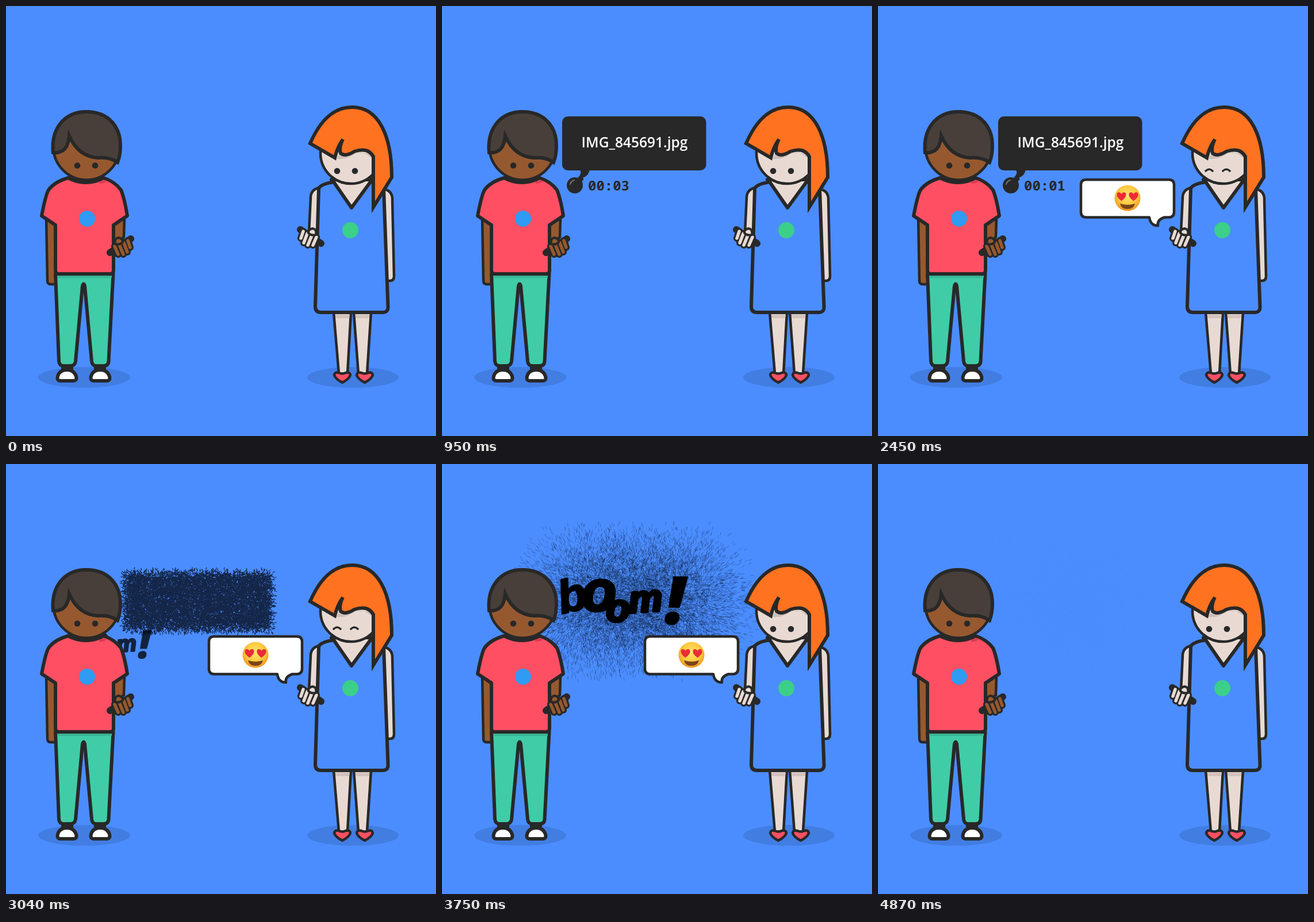
An HTML page with a canvas that plays this animation: 748x748 px, repeating every 4.91 s.

```html
<!DOCTYPE html>
<html lang="en">
<head>
<meta charset="utf-8">
<title>Boom</title>
<style>
html, body { margin: 0; width: 100%; height: 100%; overflow: hidden; background: #4b8dff; }
canvas, svg { position: absolute; left: 0; top: 0; width: 100%; height: 100%; display: block; }
.line { stroke: #282828; stroke-width: 6; stroke-linejoin: round; stroke-linecap: round; }
.thin { stroke-width: 4.5; }
.sharp { stroke-linejoin: miter; }
.ink { fill: #282828; }
.none { fill: none; }
.skin1 { fill: #96592f; }
.skin2 { fill: #e8dad3; }
.red { fill: #ff4f63; }
.file { font: 600 24.5px "Open Sans", "Noto Sans", sans-serif; fill: #fff; text-anchor: middle; }
.clock { font: 700 24px "Noto Sans Mono", monospace; fill: #282828; }
.boom text { font: italic 700 80px "Liberation Sans", sans-serif; text-anchor: middle;
  stroke: #000; stroke-width: 5; stroke-linejoin: round; }
.boom .bang { font: italic 800 114px "Open Sans", sans-serif; stroke-width: 2; }

.anim { animation: 4910ms linear infinite both; }
.bubble { animation-name: bubble; }
.three { animation-name: three; animation-timing-function: step-end; }
.two { animation-name: two; animation-timing-function: step-end; }
.one { animation-name: one; animation-timing-function: step-end; }
.reply { animation-name: reply; }
.open { animation-name: open; animation-timing-function: step-end; }
.smile { animation-name: smile; animation-timing-function: step-end; }
.boom { animation-name: boom; transform-origin: 313px 236px; }
.boomfade { animation-name: boomfade; }

@keyframes bubble {
  0%, 5% { opacity: 0; transform: translateY(40px); animation-timing-function: cubic-bezier(.215,.61,.355,1); }
  7% { opacity: 1; }
  12% { opacity: 1; transform: none; animation-timing-function: step-end; }
  59.5%, 100% { opacity: 0; transform: none; }
}
@keyframes three { 0% { opacity: 1; } 25.3%, 100% { opacity: 0; } }
@keyframes two { 0% { opacity: 0; } 25.3% { opacity: 1; } 42.4%, 100% { opacity: 0; } }
@keyframes one { 0% { opacity: 0; } 42.4% { opacity: 1; } 59.5%, 100% { opacity: 0; } }
@keyframes reply {
  0%, 44% { opacity: 0; transform: translateY(42px); animation-timing-function: cubic-bezier(.215,.61,.355,1); }
  46% { opacity: 1; }
  53%, 90.6% { opacity: 1; transform: none; }
  95%, 100% { opacity: 0; transform: none; }
}
@keyframes open { 0% { opacity: 1; } 44% { opacity: 0; } 73.3%, 100% { opacity: 1; } }
@keyframes smile { 0% { opacity: 0; } 44% { opacity: 1; } 73.3%, 100% { opacity: 0; } }
@keyframes boom {
  0%, 60.1% { transform: translate(-190px, 115px) scale(.4); animation-timing-function: cubic-bezier(.215,.61,.355,1); }
  75.4%, 100% { transform: none; }
}
@keyframes boomfade {
  0%, 60.1% { opacity: 0; }
  62.5%, 89.6% { opacity: 1; }
  94%, 100% { opacity: 0; }
}
</style>
</head>
<body>
<canvas width="748" height="748"></canvas>
<svg viewBox="0 0 748 748">
  <defs>
    <radialGradient id="face" cx=".5" cy=".4" r=".6">
      <stop offset="0" stop-color="#ffe66e"/>
      <stop offset=".6" stop-color="#fdca3f"/>
      <stop offset="1" stop-color="#ee9420"/>
    </radialGradient>
    <path id="heart" d="M0 8C-5 4-8 1-8-3C-8-8-2-8 0-4C2-8 8-8 8-3C8 1 5 4 0 8Z" fill="#ea2b38"/>
    <path id="shoe" class="line" fill="#fff"
      d="M95 652Q88 652 90 644Q93 633 106 633Q118 633 122 644Q124 652 117 652Z"/>
    <path id="pump" class="line thin red" d="M571 642Q572 636 579 638Q585 641 591 638Q598 636 599 642Q597 649 585 655Q573 649 571 642Z"/>
    <path id="fingers" d="M189 418L195 432M197 415L204 432M205 412L211 428M212 408L216 420"/>
    <g id="hand">
      <use href="#fingers" class="line" style="stroke-width:12"/>
      <path class="line none" style="stroke-width:12" d="M181 429L217 405"/>
      <use href="#fingers" stroke="currentColor" stroke-width="5.500" stroke-linecap="round"/>
      <path class="line" style="stroke-width:4" fill="currentColor" d="M190 414Q188 404 196 403Q204 405 203 411Q198 416 190 414Z"/>
    </g>
  </defs>

  <g fill="#427de2">
    <ellipse cx="136" cy="646" rx="80" ry="18"/>
    <ellipse cx="603.5" cy="646" rx="79.5" ry="18"/>
  </g>

  <g class="anim bubble">
    <rect class="ink" x="209" y="192" width="250.500" height="94" rx="10"/>
    <path class="ink" d="M239 284Q245 291 236 299Q254 301 257 284Z"/>
    <text class="file" x="335" y="246">IMG_845691.jpg</text>
    <circle class="ink" cx="231" cy="312" r="14"/>
    <path class="line none" d="M240 303L242 301" style="stroke-width:8"/>
    <path d="M223 310Q225 304 230 303" fill="none" stroke="#777" stroke-width="2" stroke-linecap="round"/>
    <g class="clock">
      <text class="anim three" x="254" y="321">00:03</text>
      <text class="anim two" x="254" y="321">00:02</text>
      <text class="anim one" x="254" y="321">00:01</text>
    </g>
  </g>

  <g class="anim boomfade"><g class="anim boom">
    <text x="225" y="256" style="stroke-width:3" transform="rotate(-13 225 226)">b</text>
    <text x="273" y="255" style="font-size:98px">o</text>
    <text x="306" y="274" style="font-size:68px">o</text>
    <text x="354" y="257" style="font-size:66px" transform="rotate(-4 354 240)">m</text>
    <text class="bang" x="405" y="278">!</text>
  </g></g>

  <g class="anim reply">
    <path class="line thin" fill="#fff" d="M362 300H506Q515 300 515 309V356Q515 365.500 506 365.500H498Q485 370 487 380Q474 380 472 365.500H362Q353 365.500 353 356V309Q353 300 362 300Z"/>
    <circle cx="434" cy="332" r="22.500" fill="url(#face)"/>
    <path d="M421 341.500Q434 346 447 341.500Q445 351 434 351Q423 351 421 341.500Z" fill="#7a4418"/>
    <use href="#heart" x="423.500" y="329"/>
    <use href="#heart" x="444.500" y="329"/>
  </g>

  <g id="boy">
    <path class="line thin skin1" d="M70 370L72 478Q72 484 78 484H87V370Z"/>
    <path class="line thin skin1" d="M186 370H206L205 402L188 418Z"/>
    <path class="ink" d="M96 624H117V636H96ZM153 624H174V636H153Z"/>
    <use href="#shoe"/><use href="#shoe" x="58"/>
    <path class="line" fill="#40cca7" d="M86 466L92 618Q93 626 100 626H112Q120 626 121 618L133 487Q135 480 137 487L149 618Q150 626 157 626H170Q178 626 178.500 618L186.500 466Z"/>
    <path d="M89 469H184V473H89Z" fill="#38b595"/>
    <path class="line thin skin1" d="M108 299Q138 280 170 299Q139 317 108 299Z"/>
    <path class="line red" d="M108 299Q84 306 74 320Q69 328 62 365L86 381V460Q86 466 92 466H181Q187 466 187 460V381L211 365Q206 334 200 320Q190 306 170 299Q139 315 108 299Z"/>
    <path d="M160 306L174 303Q176 308 164 309Z" fill="#d53c50"/>
    <circle class="line thin skin1" cx="140" cy="245" r="57.500"/>
    <path class="line sharp" fill="#483f3a" d="M82 255C78 215 100 184 140 184C180 184 199 212 199 243Q199 260 194 272Q180 262 160 264Q126 262 110 226Q108 246 98 252Q91 256 82 255Z"/>
    <circle class="ink" cx="124" cy="277.500" r="5.300"/><circle class="ink" cx="155" cy="277.500" r="5.300"/>
    <circle cx="141" cy="370" r="14" fill="#2f9bf2"/>
    <use href="#hand" color="#96592f"/>
  </g>

  <g id="girl">
    <path class="line thin skin2" d="M570 533L579 640H594L600 533ZM605 533L613 640H628L635 533Z"/>
    <path d="M573 537H598L597 543H573ZM608 537H632V543H609Z" fill="#d3c2bd"/>
    <use href="#pump"/><use href="#pump" x="39"/>
    <path class="line thin skin2" d="M545 316Q531 319 530 332L527 394L542 412Z"/>
    <path class="line thin skin2" d="M656 318Q671 321 672 334L675 470Q675 478 668 478H660Z"/>
    <path class="line skin2" d="M566 302H640L601 351Z"/>
    <path class="line" fill="#4b8dff" d="M570 306Q546 310 544 318L538 523Q538 533 548 533H655Q665 533 664.500 523L657 318Q652 308 634 306L601 351Z"/>
    <circle class="line thin skin2" cx="600" cy="256" r="53"/>
    <path d="M575 266Q592 268 606 257Q622 251 635 264V256H580Z" fill="#cbbdb8"/>
    <path class="line sharp" fill="#ff7220" d="M529 239C546 200 570 176 602 176C648 176 671 225 671 298L639 350V262Q630 245 606 253Q590 263 582 256Q579 246 586 232Q576 246 572 264Z"/>
    <g class="anim open">
      <circle class="ink" cx="576" cy="287" r="5.300"/><circle class="ink" cx="607" cy="287" r="5.300"/>
    </g>
    <path class="line none anim smile" style="stroke-width:3.500" d="M570 287Q576 281 582 287M600 287Q606 281 612 287"/>
    <circle cx="599" cy="390" r="14" fill="#3bcf8a"/>
    <use href="#hand" color="#e8dad3" transform="translate(729 -16) scale(-1 1)"/>
  </g>
</svg>
<script>
const LOOP = 4910, BLAST = 2920, REACH = 134;
const ctx = document.querySelector('canvas').getContext('2d');

let seed = 7;
const rnd = () => (seed = (seed * 16807) % 2147483647) / 2147483647;
const clamp = v => Math.max(0, Math.min(1, v));
const mix = (a, b, k) => a + (b - a) * clamp(k);

// Splinters of the bubble, each with a start, a heading and a speed
const bits = Array.from({ length: 15000 }, () => {
  const a = rnd() * Math.PI * 2;
  return { x: 209 + rnd() * 250, y: 192 + rnd() * 94, dx: Math.cos(a), dy: Math.sin(a), v: Math.sqrt(rnd()) };
});

function fade(t) {
  if (t < 3300) return .85;
  if (t < 4040) return mix(.85, .33, (t - 3300) / 740);
  return mix(.33, .02, (t - 4040) / 310);
}

function draw(t) {
  ctx.clearRect(0, 0, 748, 748);
  if (t < BLAST) return;
  const spread = REACH * clamp((t - BLAST) / 1140);
  const len = Math.min(6, 3 + spread / 10);
  ctx.beginPath();
  for (const b of bits) {
    const far = b.v * spread;
    const x = b.x + b.dx * far, y = b.y + b.dy * far;
    ctx.moveTo(x, y);
    ctx.lineTo(x - b.dx * len, y - b.dy * len);
  }
  ctx.globalAlpha = fade(t);
  ctx.lineWidth = mix(1.4, .5, spread / 50);
  ctx.strokeStyle = '#0b1428';
  ctx.stroke();
}

let start;
function tick(now) {
  start ??= now;
  draw((now - start) % LOOP);
  requestAnimationFrame(tick);
}
requestAnimationFrame(tick);
</script>
</body>
</html>
```
